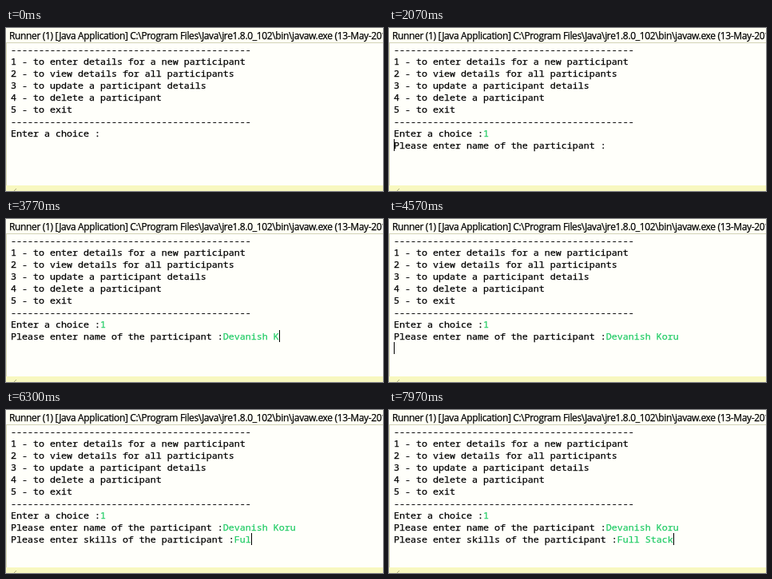
An HTML page for the animation above (8000 ms loop, 472 px wide and 204 px high).

```html
<!DOCTYPE html>
<html lang="en">
<head>
<meta charset="utf-8">
<title>Console session</title>
<style>
  html, body { margin: 0; width: 100%; height: 100%; overflow: hidden; background: #fffffa; }
  svg { display: block; width: 472px; height: 204px; }
  text { white-space: pre; fill: #000; stroke: #000; stroke-width: 0.25px; }
  .title { font: 12px "Open Sans", "Noto Sans", sans-serif; letter-spacing: -0.35px; }
  .row { font: 11.667px "Noto Sans Mono", "DejaVu Sans Mono", monospace; }
  .input { fill: #22cc66; stroke: #22cc66; }
</style>
</head>
<body>
<svg id="stage" viewBox="0 0 472 204">
  <rect width="472" height="204" fill="#fffffa"/>
  <rect width="472" height="18" fill="#fffff4"/>
  <rect y="18" width="472" height="1" fill="#d2d2b8"/>
  <rect y="19" width="1" height="185" fill="#d8d8b4"/>
  <rect y="197" width="472" height="7" fill="#f8f8c0"/>
  <path d="M10 204l3-3" stroke="#a8a880" fill="none"/>
  <text class="title" x="4" y="14">Runner (1) [Java Application] C:\Program Files\Java\jre1.8.0_102\bin\javaw.exe (13-May-2018 10:24:06)</text>
  <g id="rows"></g>
  <rect id="caret" width="1" height="15" fill="#000"/>
</svg>
<script>
const LOOP = 8000, LEFT = 6, TOP = 19, CHAR = 7, LINE = 15;
const RULE = "-".repeat(43);
const MENU = [
  RULE,
  "1 - to enter details for a new participant",
  "2 - to view details for all participants",
  "3 - to update a participant details",
  "4 - to delete a participant",
  "5 - to exit",
  RULE
];

// Each key time reveals one more character of the answer.
const FIELDS = [
  { prompt: "Enter a choice :", shown: 0, answer: "1", keys: [1870] },
  { prompt: "Please enter name of the participant :", shown: 2070, answer: "Devanish Koru",
    keys: [2630, 2730, 2830, 2930, 3030, 3130, 3230, 3330, 3530, 3770, 3870, 3970, 4070] },
  { prompt: "Please enter skills of the participant :", shown: 4670, answer: "Full Stack",
    keys: [5970, 6130, 6300, 6430, 6570, 6800, 7030, 7200, 7830, 7970] }
];
const ENTER = [1970, 4570];
const CARET_OFF = [[0, 630], [1130, 1670], [2530, 2630], [5200, 5700], [7700, 7830]];

const rows = document.getElementById("rows");
const caret = document.getElementById("caret");

function add(parent, tag, attrs = {}, content = "") {
  const node = document.createElementNS("http://www.w3.org/2000/svg", tag);
  for (const name in attrs) node.setAttribute(name, attrs[name]);
  node.textContent = content;
  return parent.appendChild(node);
}

function addRow(index, content = "") {
  return add(rows, "text", { class: "row", x: LEFT, y: TOP + LINE * index + 12 }, content);
}

MENU.forEach((line, i) => addRow(i, line));
FIELDS.forEach((field, i) => {
  const row = addRow(MENU.length + i);
  field.label = add(row, "tspan");
  field.input = add(row, "tspan", { class: "input" });
});

const countUntil = (times, t) => times.filter(time => time <= t).length;

function render(t) {
  for (const field of FIELDS) {
    field.typed = countUntil(field.keys, t);
    field.label.textContent = t >= field.shown ? field.prompt : "";
    field.input.textContent = field.answer.slice(0, field.typed);
  }

  // After a new prompt the caret waits at the line start until a key is hit.
  const current = countUntil(ENTER, t);
  const { prompt, typed } = FIELDS[current];
  const column = typed || current === 0 ? prompt.length + typed : 0;
  caret.setAttribute("x", LEFT + CHAR * column);
  caret.setAttribute("y", TOP + LINE * (MENU.length + current));
  const hidden = CARET_OFF.some(([from, to]) => t >= from && t < to);
  caret.setAttribute("visibility", hidden ? "hidden" : "visible");
}

const start = performance.now();
function tick() {
  render((performance.now() - start) % LOOP);
  requestAnimationFrame(tick);
}
render(0);
requestAnimationFrame(tick);
</script>
</body>
</html>
```
